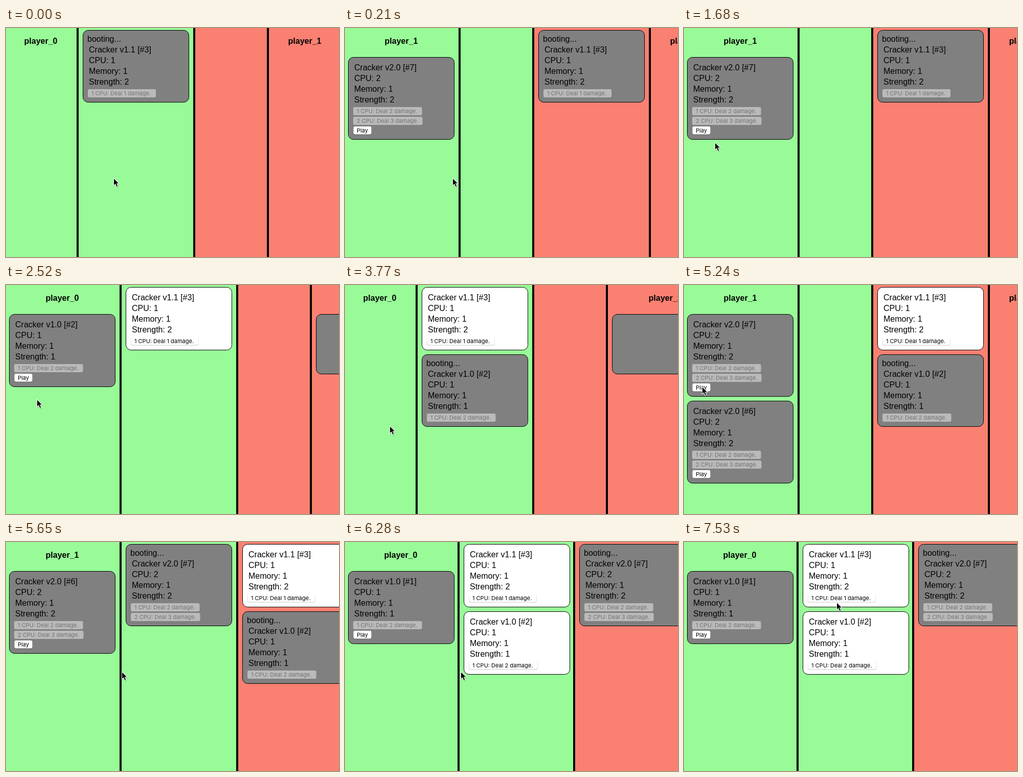
These frames come from a looping animation (651 by 449 pixels, 8000 ms). An HTML page:

```html
<!DOCTYPE html>
<html lang="en">
<head>
<meta charset="utf-8">
<title>Card duel</title>
<style>
html, body { margin: 0; width: 100%; height: 100%; overflow: hidden; background: #fa8072; }
svg { display: block; position: absolute; left: 0; top: 0; }
text { font: 16px "Liberation Sans", Arial, sans-serif; white-space: pre; }
.name { font-weight: bold; text-anchor: middle; }
.btn { font: 11px Inter, Roboto, sans-serif; }
</style>
</head>
<body>
<svg width="651" height="449" viewBox="0 0 651 449">
  <g id="board"></g>
  <g id="cursor">
    <path d="M1 1.5V14L4 11.3 6.4 17 8.3 16.2 5.9 10.6H10Z" transform="translate(.8 1.4)" fill="#000" stroke="#000" stroke-width="2" opacity=".16"/>
    <path d="M1 1.5V14L4 11.3 6.4 17 8.3 16.2 5.9 10.6H10Z" stroke="#fff" stroke-width="2" paint-order="stroke"/>
  </g>
</svg>
<script>
const LOOP = 8000;
const deal = (cpu, dmg) => `${cpu} CPU: Deal ${dmg} damage.`;
const WIDTH = { [deal(1, 1)]: 133, [deal(1, 2)]: 134.5, [deal(2, 3)]: 135.5, Play: 36 };

const basic = { ver: '1.0', cpu: 1, str: 1, acts: [deal(1, 2)] };
const strong = { ver: '2.0', cpu: 2, str: 2, acts: [deal(1, 2), deal(2, 3)] };
const CARDS = {
  1: basic, 2: basic, 6: strong, 7: strong,
  3: { ver: '1.1', cpu: 1, str: 2, acts: [deal(1, 1)] }
};

// stacks: [x, y, ...cards], each card an id plus h(and), b(ooting), l(ive) or x (face down)
const SCENES = [
  { at: 0, bars: [138, 366, 510], names: [[0, 68], [1, 584]], stacks: [[150, 4, '3b']] },
  { at: 210, bars: [222, 366, 594], names: [[1, 110], [0, 668]],
    stacks: [[6, 57, '7h'], [378, 4, '3b']] },
  { at: 2520, bars: [222, 450, 594], names: [[0, 110]],
    stacks: [[6, 57, '2h'], [234, 4, '3l'], [606, 57, '7x']] },
  { at: 3560, bars: [138, 366, 510], names: [[0, 68], [1, 626]],
    stacks: [[150, 4, '3l', '2b'], [522, 57, '7x']] },
  { at: 4400, bars: [222, 366, 594], names: [[1, 110], [0, 668]],
    stacks: [[6, 57, '7h', '6h'], [378, 4, '3l', '2b']] },
  { at: 5440, bars: [222, 450], names: [[1, 110]],
    stacks: [[6, 57, '6h'], [234, 4, '7b'], [462, 4, '3l', '2b']] },
  { at: 6280, bars: [220, 446], names: [[0, 109]],
    stacks: [[6, 57, '1h'], [232, 4, '3l', '2l'], [458, 4, '7b']] }
];

// time, x, y
const MOVES = [
  [0, 210, 294], [1050, 181, 283], [1260, 82, 259], [1470, 61, 224], [1680, 60, 224],
  [3150, 50, 194], [3350, 46, 189], [3560, 42, 186], [3770, 87, 276],
  [5030, 50, 214], [5240, 35, 199], [5440, 37, 199], [5650, 226, 254],
  [6900, 317, 174], [7110, 309, 152], [7320, 297, 131], [7530, 298, 118]
];

const rect = (x, y, w, h, fill, more = '') =>
  `<rect x="${x}" y="${y}" width="${w}" height="${h}" fill="${fill}" ${more}/>`;
const text = (x, y, str, more = '') => `<text x="${x}" y="${y}" ${more}>${str}</text>`;

function button(x, y, label, enabled) {
  const w = WIDTH[label];
  const box = enabled
    ? rect(x, y + .5, w, 16, '#000', 'rx="3.5" opacity=".22"') + rect(x + .5, y, w - 1, 15.5, '#fff', 'rx="3"')
    : rect(x, y, w, 16, '#bababa', 'rx="3"');
  return box + text(x + 7, y + 12, label, `class="btn" fill="${enabled ? '#000' : '#737373'}"`);
}

function card(x, y, code) {
  const { ver, cpu, str, acts } = CARDS[code[0]], mode = code[1];
  const hidden = mode == 'x', live = mode == 'l', boot = mode == 'b' ? 18 : 0;
  const labels = mode == 'h' ? [...acts, 'Play'] : acts;
  const h = hidden ? 118 : 105 + 19 * labels.length + boot;
  let out = rect(x + .5, y + .5, 207, h - 1, live ? '#fff' : '#808080', 'rx="10" stroke="#000"');
  if (!hidden) {
    if (boot) out += text(x + 9, y + 23, 'booting...');
    const lines = [`Cracker v${ver} [#${code[0]}]`, `CPU: ${cpu}`, 'Memory: 1', `Strength: ${str}`];
    lines.forEach((s, i) => out += text(x + 12, y + 26 + boot + 21 * i, s));
    labels.forEach((s, i) =>
      out += button(x + 10, y + 98 + boot + 19 * i, s, live || s == 'Play'));
  }
  return [out, h];
}

function draw({ bars, names, stacks }) {
  let out = rect(0, 0, 651, 449, '#fa8072') + rect(0, 0, bars[1], 449, '#98fb98');
  for (const x of bars) out += rect(x, 0, 4, 449, '#000');
  for (const [n, x] of names) out += text(x, 31, 'player_' + n, 'class="name"');
  for (let [x, y, ...codes] of stacks)
    for (const code of codes) {
      const [svg, h] = card(x, y, code);
      out += svg;
      y += h + 8;
    }
  return out;
}

const board = document.getElementById('board');
const cursor = document.getElementById('cursor');
let shown;

function frame(now) {
  const t = now % LOOP;
  const scene = SCENES.findLast(s => s.at <= t);
  if (scene != shown) board.innerHTML = draw(shown = scene);
  const [, x, y] = MOVES.findLast(m => m[0] <= t);
  cursor.setAttribute('transform', `translate(${x} ${y})`);
  requestAnimationFrame(frame);
}
frame(0);
</script>
</body>
</html>
```
